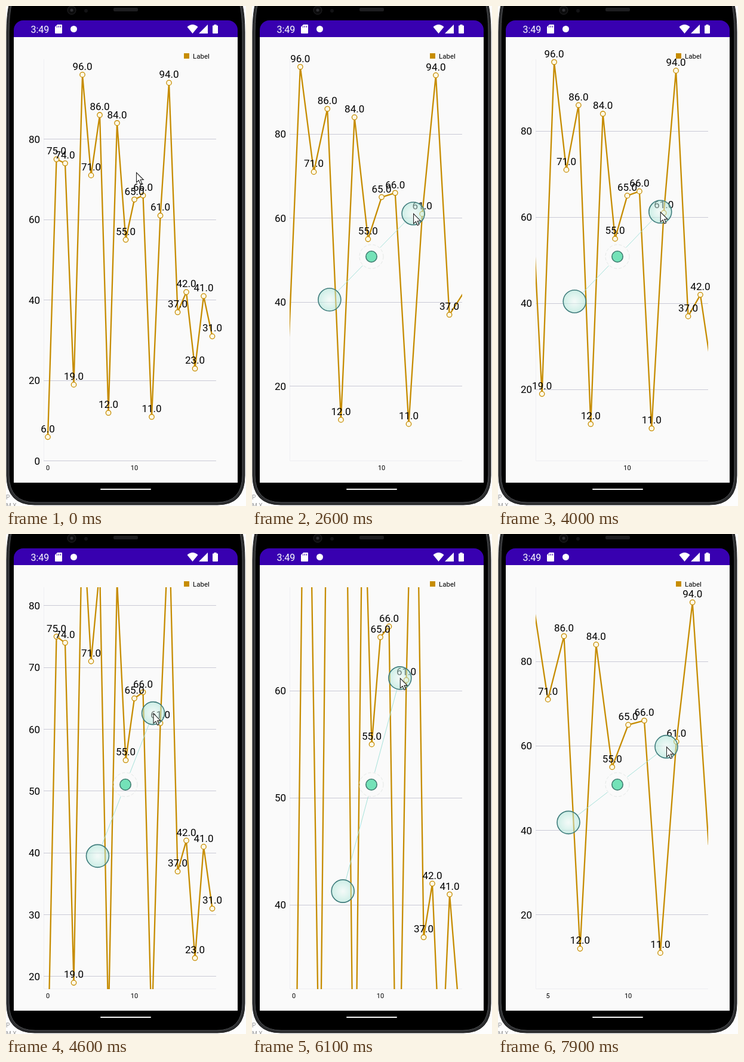
Recreate the animation shown at these times as an HTML page. Size 402 px wide and 836 px high, loop 8000 ms.

```html
<!DOCTYPE html>
<html lang="en">
<head>
<meta charset="utf-8">
<title>Line chart pinch zoom</title>
<style>
  html, body { margin: 0; width: 100%; height: 100%; overflow: hidden; background: #fdfdfd; }
  svg { display: block; width: 402px; height: 836px; font-family: Roboto, sans-serif; }
  .value { font-size: 17px; text-anchor: middle; }
  .yLabel { font-size: 17px; text-anchor: end; }
  .xLabel { font-size: 11px; text-anchor: middle; }
  .grid { stroke: #cacad6; stroke-width: 1; }
  .dot { fill: #fffae6; stroke: #c68c00; stroke-width: 1.3; }
  .link { stroke: #a6e2da; stroke-width: 1; }
  .tip { fill: url(#touch); stroke: #3f7c7c; stroke-width: 1.6; }
</style>
</head>
<body>
<svg viewBox="0 0 402 836">
  <defs>
    <clipPath id="plot"><rect x="63" y="89" width="289" height="672"/></clipPath>
    <radialGradient id="touch">
      <stop offset="0" stop-color="#eefaf6" stop-opacity=".5"/>
      <stop offset="1" stop-color="#a8e4d6" stop-opacity=".55"/>
    </radialGradient>
  </defs>

  <!-- phone -->
  <g font-size="10" fill="#9a9a9a"><text x="0" y="825">P</text><text x="0" y="839">M X</text></g>
  <path d="M6 -6 Q1 14 1 44 V785 Q1 834 48 834 H354 Q400 834 400 785 V44 Q400 14 395 -6Z" fill="#2c2d2f" stroke="#161616"/>
  <path d="M10 -6 Q5 14 5 44 V784 Q5 830 49 830 H353 Q396 830 396 784 V44 Q396 14 391 -6Z" fill="#000" stroke="#55575a"/>
  <circle cx="110" cy="7" r="7" fill="#0b0b0c" stroke="#242426"/>
  <circle cx="110" cy="7" r="2.5" fill="#2e2e32"/>
  <circle cx="134" cy="8" r="3" fill="#121214"/>
  <rect x="180" y="3" width="41" height="6" rx="2" fill="#1d1d1f"/>

  <!-- screen -->
  <path d="M13 52 V40 A16 16 0 0 1 29 24 H372 A16 16 0 0 1 388 40 V52Z" fill="#3800b0"/>
  <rect x="13" y="52" width="375" height="745" fill="#fafafa"/>
  <rect x="158" y="807" width="85" height="2" rx="1" fill="#f2f2f2"/>
  <g fill="#fff">
    <text x="41.5" y="45" font-size="16">3:49</text>
    <path d="M86 31 H93 Q94 31 94 32 V45 Q94 46 93 46 H83 Q82 46 82 45 V35Z"/>
    <circle cx="113.5" cy="38.5" r="5.5"/>
    <path d="M312.5 46 L303.5 35 Q312.5 27 321.5 35Z"/>
    <path d="M323 46 L338 31 V46Z"/>
    <path d="M346 33.5 Q346 32.5 347 32.5 H348.5 V31 H352.5 V32.5 H354 Q355 32.5 355 33.5 V45 Q355 46 354 46 H347 Q346 46 346 45Z"/>
  </g>
  <path d="M85.5 33.5V36M88.5 33V36M91.5 33V36" stroke="#3800b0"/>

  <!-- chart -->
  <path d="M63.5 89 V760.5 H352" fill="none" stroke="#eeeef2"/>
  <g id="axes"></g>
  <path id="line" clip-path="url(#plot)" fill="none" stroke="#c68c00" stroke-width="2.3"/>
  <g id="points"></g>
  <rect x="298" y="79" width="9" height="9" fill="#c68c00"/>
  <text x="313" y="88" font-size="11.5">Label</text>

  <g id="fingers">
    <line class="link"/><line class="link"/>
    <circle cx="200" cy="419" r="20" fill="none" stroke="#e4e8e6" stroke-dasharray="5 3"/>
    <circle cx="200" cy="419" r="9.2" fill="#74e2b8" stroke="#3f7c70" stroke-width="1.6"/>
    <circle class="tip" r="19"/><circle class="tip" r="19"/>
  </g>
  <path id="cursor" d="M0 0 V16.5 L3.8 13 L6.6 19.3 L9.3 18.1 L6.6 12 H11.8Z" fill="#fff" stroke="#222" stroke-width="1.1"/>
</svg>

<script>
const LOOP = 8000, STEP = 100;
const LAG = 100;           // the chart answers one step after the fingers
const TOUCH_START = 1000;  // the cursor arrives and the fingers appear
const data = [6, 75, 74, 19, 96, 71, 86, 12, 84, 55, 65, 66, 11, 61, 94, 37, 42, 23, 41, 31];
const box = { left: 63, right: 352, top: 89, bottom: 761 };
const center = { x: 200, y: 419 };
const hover = { x: 18, y: 141 };  // cursor before the pinch, from the center
const rest = { x: 51, y: 70 };    // finger spread at which zoom is 1

// Each stroke opens the fingers by x, y and closes them again.
const strokes = [
  { at: 2180, half: 750, x: 47, y: 5 },    // horizontal
  { at: 3950, half: 750, x: 21, y: 5 },
  { at: 4840, half: 750, x: -7, y: 64 },   // vertical
  { at: 5965, half: 750, x: -4, y: 117 },
  { at: 7195, half: 1150, x: 95, y: 50 },  // diagonal
  { at: 8100, half: 900, x: 0, y: -26 }
];

const $ = id => document.getElementById(id);
const links = document.querySelectorAll('.link');
const tips = document.querySelectorAll('.tip');

// Smooth rise and fall between 0 and 1.
function pulse(t, { at, half }) {
  const d = Math.abs(t - at) / half;
  return d < 1 ? Math.cos(d * Math.PI / 2) ** 2 : 0;
}

function spread(t, axis) {
  return strokes.reduce((sum, s) => sum + s[axis] * pulse(t, s), rest[axis]);
}

function cursorOffset(t, axis) {
  const away = t < TOUCH_START ? pulse(t, { at: 0, half: TOUCH_START }) : 0;
  return spread(t, axis) + (hover[axis] - rest[axis]) * away;
}

const zoom = (t, axis) => Math.max(1, spread(t - LAG, axis) / rest[axis]);

// Axis step with one significant digit; digits above 5 round up to 10.
function niceStep(raw) {
  const mag = 10 ** Math.floor(Math.log10(raw));
  const digit = Math.round(raw / mag);
  return (digit > 5 ? 10 : digit) * mag;
}

function ticks(step, max) {
  return Array.from({ length: Math.floor(max / step) + 1 }, (_, i) => i * step);
}

const text = (cls, x, y, s) =>
  `<text class="${cls}" x="${x.toFixed(2)}" y="${y.toFixed(2)}">${s}</text>`;
const inX = x => x >= box.left && x <= box.right;
const inY = y => y >= box.top && y <= box.bottom + 0.5;

function drawChart(zoomX, zoomY) {
  const unitX = 14.5 * zoomX, unitY = 6.73 * zoomY;
  const px = i => 211.4 + unitX * (i - 9.75);
  const py = v => 414.4 - unitY * (v - 51.5);
  let axes = '', points = '', labels = '';

  for (const v of ticks(niceStep((box.bottom - box.top) / unitY / 6), 100)) {
    const y = py(v), row = Math.floor(y) + 0.5;
    if (!inY(y)) continue;
    axes += `<line class="grid" x1="${box.left}" x2="${box.right}" y1="${row}" y2="${row}"/>`
      + text('yLabel', 57, y + 6, v);
  }
  for (const i of ticks(niceStep((box.right - box.left) / unitX / 2), 20)) {
    if (inX(px(i))) axes += text('xLabel', px(i), 776, i);
  }
  data.forEach((v, i) => {
    const x = px(i), y = py(v);
    if (!inX(x) || !inY(y)) return;
    points += `<circle class="dot" cx="${x}" cy="${y}" r="4.2"/>`;
    labels += text('value', x, y - 8, v.toFixed(1));
  });

  $('axes').innerHTML = axes;
  $('line').setAttribute('d', 'M' + data.map((v, i) => px(i) + ' ' + py(v)).join('L'));
  $('points').innerHTML = points + labels;
}

function set(el, attrs) {
  for (const name in attrs) el.setAttribute(name, attrs[name]);
}

function drawTouch(t) {
  const dx = cursorOffset(t, 'x'), dy = cursorOffset(t, 'y');
  const dist = Math.hypot(dx, dy);
  [1, -1].forEach((side, i) => {
    const at = r => [center.x + side * dx * r / dist, center.y - side * dy * r / dist];
    const [x1, y1] = at(21), [x2, y2] = at(Math.max(21, dist - 20)), [cx, cy] = at(dist);
    set(links[i], { x1, y1, x2, y2 });
    set(tips[i], { cx, cy });
  });
  $('fingers').style.display = t < TOUCH_START ? 'none' : '';
  set($('cursor'), { transform: `translate(${center.x + dx + 0.5} ${center.y - dy + 0.5})` });
}

let shown = -1;
function tick() {
  const t = Math.floor(performance.now() % LOOP / STEP) * STEP;
  if (t !== shown) {
    shown = t;
    drawChart(zoom(t, 'x'), zoom(t, 'y'));
    drawTouch(t);
  }
  requestAnimationFrame(tick);
}
tick();
</script>
</body>
</html>
```
